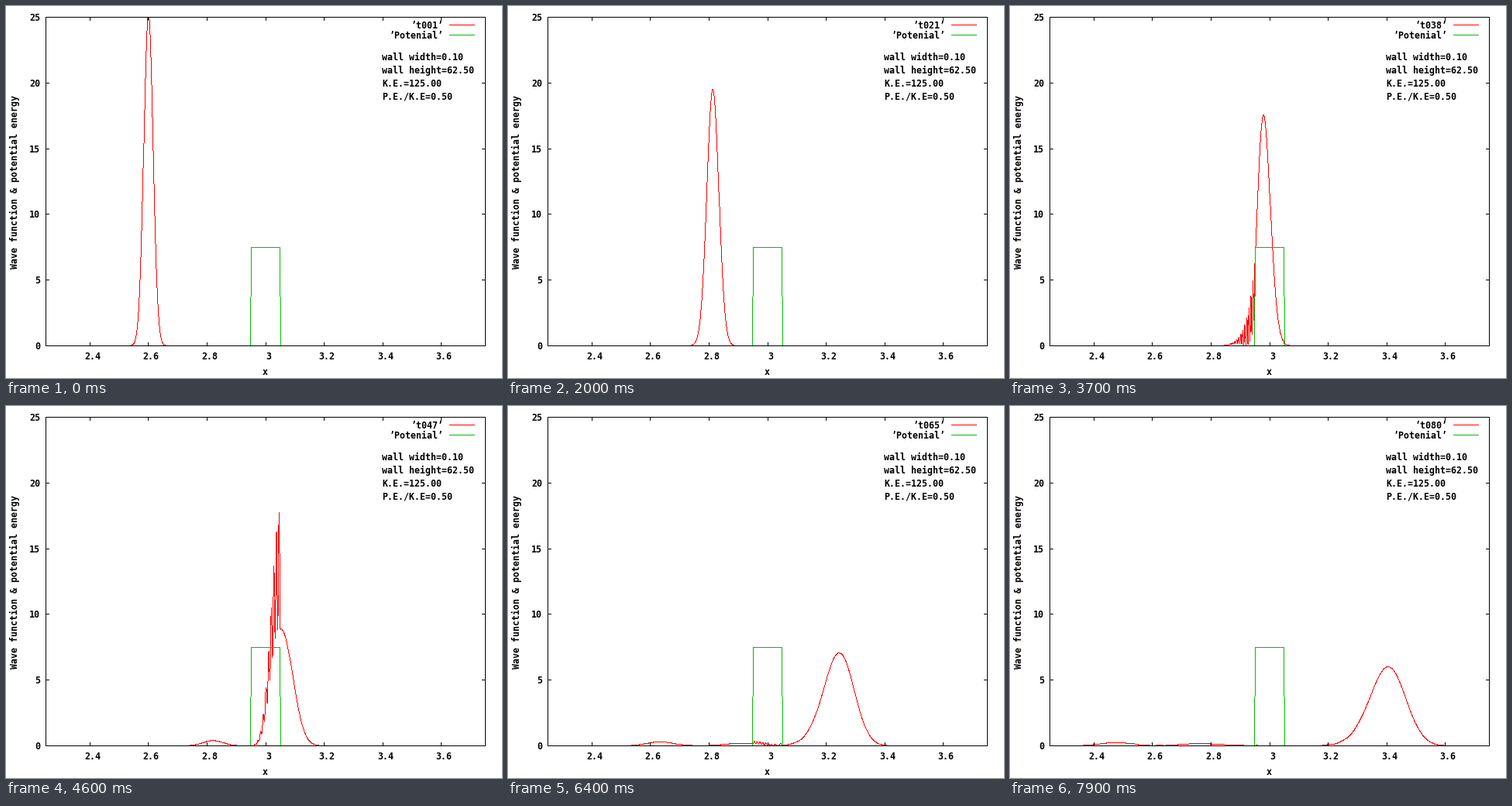
A matplotlib script that plays this animation: 640x480 px, repeating every 8000 ms.

```python
import numpy as np
import matplotlib.pyplot as plt
from matplotlib.animation import FuncAnimation

W, H, DPI = 640, 480, 100
FRAMES, INTERVAL = 80, 100
LEFT, RIGHT, TOP, BOTTOM = 51, 618, 14, 438
PX = 72 / DPI
BLACK, RED, GREEN = (0, 0, 0), (255, 0, 0), (0, 192, 0)

plt.rcParams["font.family"] = "DejaVu Sans Mono"
plt.rcParams["font.weight"] = "bold"
plt.rcParams["font.size"] = 7 / 0.602 * PX  # 7 px per character


def to_px(x, y):
    px = LEFT + (x - 2.25) * (RIGHT - LEFT) / 1.5
    py = BOTTOM - y * (BOTTOM - TOP) / 25
    return np.round(px), np.round(py)


def simulate():
    """Wave packet crossing a square wall: split-step on a lattice."""
    n, span, mass, k0, substeps = 3000, 2.0, 1000.0, 500.0, 40
    dx = span / n
    x = 2 + dx * np.arange(n)
    tau = 0.0217 / substeps
    wall = np.where(np.abs(x - 3) < 0.0501, 62.5, 0.0)
    k = 2 * np.pi * np.fft.fftfreq(n, dx)
    kinetic = (1 - np.cos(k * dx)) / (mass * dx**2)
    half = np.exp(-0.5j * tau * wall)
    drift = np.exp(-1j * tau * kinetic)

    psi = np.exp(-1000 * (x - 2.6) ** 2 + 1j * k0 * x)
    psi /= np.sqrt(np.sum(np.abs(psi) ** 2) * dx)
    density = []
    for _ in range(FRAMES):
        density.append(np.abs(psi) ** 2)
        for _ in range(substeps):
            psi = half * np.fft.ifft(drift * np.fft.fft(half * psi))
    return x, density


def stroke(canvas, xs, ys, color):
    """Draw a hard-edged, one-pixel polyline inside the plot box."""
    xs, ys = np.asarray(xs, float), np.asarray(ys, float)
    step = np.maximum(np.abs(np.diff(xs)), np.abs(np.diff(ys)))
    keep = np.r_[True, step > 0]
    s = np.r_[0, np.cumsum(step)][keep]
    t = np.arange(s[-1] + 1)
    px = np.floor(np.interp(t, s, xs[keep]) + 0.5).astype(int)
    py = np.floor(np.interp(t, s, ys[keep]) + 0.5).astype(int)
    inside = (px >= LEFT) & (px <= RIGHT) & (py >= TOP) & (py <= BOTTOM)
    canvas[py[inside], px[inside]] = color


x, density = simulate()

fig = plt.figure(figsize=(W / DPI, H / DPI), dpi=DPI, facecolor="white")
ax = fig.add_axes([0, 0, 1, 1])
blank = np.full((H, W, 3), 255, np.uint8)
plot = ax.imshow(blank, extent=(0, W, H, 0), interpolation="nearest",
                 aspect="auto")
ax.axis("off")


def text(px, py, s, ha="left", va="baseline", **kw):
    return ax.text(px, py, s, ha=ha, va=va, **kw)


def draw_axes(canvas):
    stroke(canvas, [LEFT, RIGHT, RIGHT, LEFT, LEFT],
           [TOP, TOP, BOTTOM, BOTTOM, TOP], BLACK)
    for v in np.arange(2.4, 3.7, 0.2):
        px, _ = to_px(v, 0)
        stroke(canvas, [px, px], [BOTTOM, BOTTOM - 4], BLACK)
        stroke(canvas, [px, px], [TOP, TOP + 4], BLACK)
    for v in range(0, 26, 5):
        _, py = to_px(0, v)
        stroke(canvas, [LEFT, LEFT + 4], [py, py], BLACK)
        stroke(canvas, [RIGHT, RIGHT - 4], [py, py], BLACK)


# Axis labels
for v in np.arange(2.4, 3.7, 0.2):
    text(to_px(v, 0)[0] + 4, 456.5, f"{v:.1f}".replace("3.0", "3"), "center")
for v in range(0, 26, 5):
    text(44, to_px(0, v)[1] + 5, str(v), "right")
text(334.5, 476, "x", "center")
text(11, 227, "Wave function & potential energy", "center", "center",
     rotation=90)

# Legend and notes
label = text(565, 29, "", "right")
text(565, 42, "’Potenial’", "right")
notes = ["wall width=0.10", "wall height=62.50", "K.E.=125.00", "P.E./K.E=0.50"]
for i, note in enumerate(notes):
    text(485, 70 + 17 * i, note)


def update(i):
    canvas = blank.copy()
    stroke(canvas, *to_px(x, density[i]), RED)
    stroke(canvas, [315, 316, 353, 354], [438, 311, 311, 438], GREEN)
    stroke(canvas, [572, 604], [24, 24], RED)
    stroke(canvas, [572, 604], [37, 37], GREEN)
    draw_axes(canvas)
    plot.set_data(canvas)
    label.set_text(f"’t{i + 1:03d}’")
    return plot, label


anim = FuncAnimation(fig, update, frames=FRAMES, interval=INTERVAL,
                     repeat=True, repeat_delay=0)
plt.show()
```
